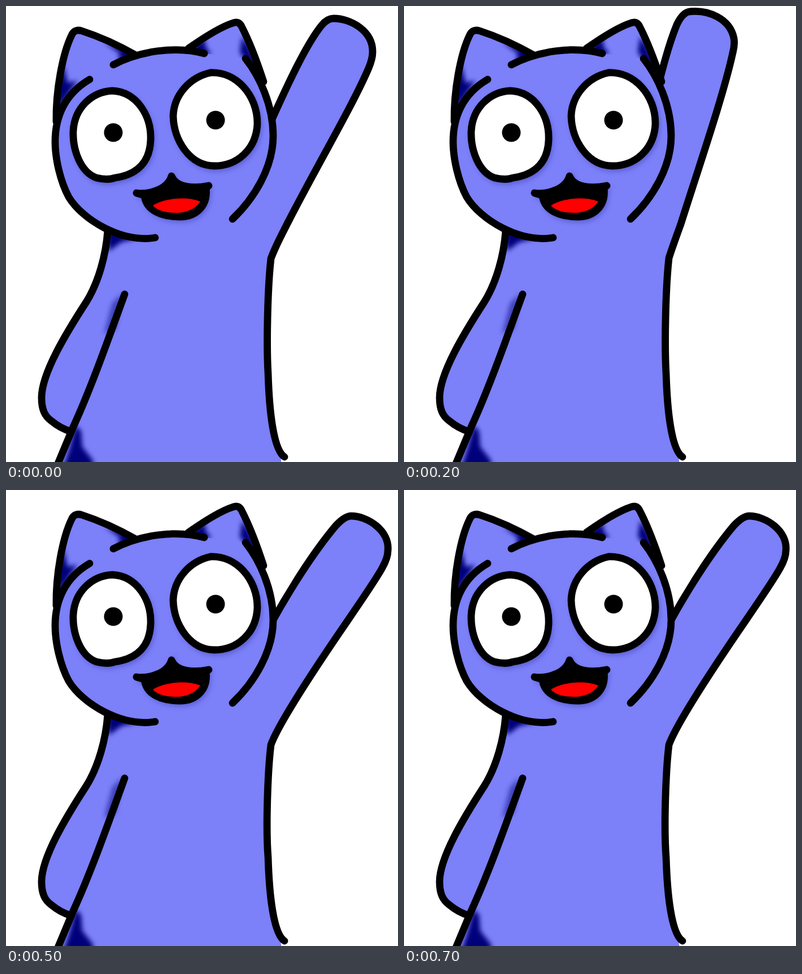
Write an HTML page that moves like this. It is 694x807 px and loops after 800 ms.

```html
<!DOCTYPE html>
<html lang="en">
<head>
<meta charset="utf-8">
<title>Waving cat</title>
<style>
  html, body { margin: 0; width: 100%; height: 100%; overflow: hidden; background: #fff; }
  svg { display: block; width: 694px; height: 807px; }
  .line { fill: none; stroke: #000; stroke-width: 12.8; stroke-linecap: round; stroke-linejoin: round; }
  .skin { fill: #7c80f9; }
  .white { fill: #fff; }
  .ink { fill: #000; }
  .dark { fill: #00007a; filter: url(#soft); }
  .glow { fill: #3c3fae; stroke: #3c3fae; stroke-width: 10; opacity: .5; filter: url(#soft); }

  #arm { animation: wave 800ms step-end infinite; }
  @keyframes wave {
    0%, 50%, 100% { d: path("M300 320L468 207C499 138 532 67 559 34Q569 22 580 22C610 22 650 44 649 82Q649 93 642 110C612 180 545 292 493 395Q476 428 469 447C463 500 461 600 464 650C466 715 473 785 493 798"); }
    12.5%, 37.5% { d: path("M300 320L461 181C480 129 497 75 518 36Q529 15 541 14C575 12 612 32 616 68Q617 79 612 94C590 165 540 278 495 388Q475 430 469 446C463 500 461 600 464 650C466 715 473 785 493 798"); }
    25% { d: path("M300 320L439 185C453 130 466 74 483 33Q493 12 505 10C538 6 577 22 584 57Q586 68 582 83C566 156 526 273 490 386Q474 430 469 446C463 500 461 600 464 650C466 715 473 785 493 798"); }
    62.5%, 87.5% { d: path("M300 320L468 239C497 186 541 114 584 63Q600 46 611 46C640 46 680 72 676 108Q676 120 666 138C640 185 560 290 498 395Q476 432 469 451C463 500 460 600 464 650C466 715 473 785 493 798"); }
    75% { d: path("M300 320L466 264C497 210 550 138 597 91Q614 77 624 78C650 82 690 106 687 138Q687 154 676 170C645 215 560 308 500 404Q474 440 467 459C461 500 459 620 465 685C470 750 478 787 493 798"); }
  }
</style>
</head>
<body>
<svg viewBox="0 0 694 807">
  <defs>
    <filter id="soft" x="-50%" y="-50%" width="200%" height="200%">
      <feGaussianBlur stdDeviation="4"/>
    </filter>
    <path id="body" d="M180 395C177 440 164 489 142 524C107 578 63 650 63 693C63 715 69 726 80 734Q97 748 115 753L90 812H488L486 796C466 760 462 650 463 590L464 460L400 330Z"/>
    <path id="earL" d="M89 205C88 150 100 85 116 52Q121 40 134 44C165 54 200 70 230 87"/>
    <path id="earR" d="M323 75C350 56 380 37 402 30Q412 26 417 36C432 65 445 100 456 134"/>
    <path id="eyeL" d="M188 150C232 152 258 195 256 238C254 285 222 300 193 304Q180 309 160 304C132 294 118 255 119 222C121 180 152 152 188 150Z"/>
    <path id="eyeR" d="M362 118C408 116 445 158 445 208C443 255 408 283 369 283C325 283 297 237 296 195C297 158 325 126 362 118Z"/>
    <path id="mouth" d="M231 331C255 334 286 324 293 301C302 323 335 323 359 318L354 322C358 355 335 373 308 373C275 373 248 362 245 335Z"/>
    <clipPath id="inBody"><use href="#body"/></clipPath>
    <clipPath id="inEars"><use href="#earL"/><use href="#earR"/></clipPath>
  </defs>

  <use href="#body" class="skin"/>
  <path id="arm" class="line" style="fill:#7c80f9" d="M300 320L468 207C499 138 532 67 559 34Q569 22 580 22C610 22 650 44 649 82Q649 93 642 110C612 180 545 292 493 395Q476 428 469 447C463 500 461 600 464 650C466 715 473 785 493 798"/>

  <g clip-path="url(#inBody)">
    <path class="dark" d="M178 395L234 411L204 418L182 434Z"/>
    <path class="dark" opacity=".5" d="M206 508L188 526L174 580L194 572Z"/>
    <path class="dark" d="M123 742L133 752L135 780L154 804V815H102L112 785Z"/>
  </g>

  <!-- ears and head -->
  <use href="#earL" class="skin"/>
  <use href="#earR" class="skin"/>
  <g clip-path="url(#inEars)">
    <path class="dark" d="M102 104L109 136L126 132L112 154L90 188L91 140Z"/>
    <path class="dark" d="M174 64L232 82L220 98L198 94L202 84Z"/>
    <path class="dark" d="M326 74L352 58L354 74L364 84L340 88Z"/>
    <path class="dark" d="M418 54L430 72L456 128L424 96L414 82Z"/>
  </g>
  <path class="skin" d="M148 130C105 155 87 195 87 240C87 270 96 310 111 338C135 378 205 420 264 410L401 377C440 340 473 285 473 230C473 175 448 123 424 93L351 84C300 70 235 80 190 104Z"/>

  <g class="line">
    <use href="#earL"/>
    <use href="#earR"/>
    <path d="M190 104C235 80 300 70 351 84"/>
    <path d="M148 130C105 155 87 195 87 240C87 270 96 310 111 338C135 378 205 420 264 410"/>
    <path d="M424 93C448 123 473 175 473 230C473 285 440 340 401 377"/>
    <path d="M180 398C177 440 164 489 142 524C107 578 63 650 63 693C63 715 69 726 80 734Q97 748 115 753"/>
    <path d="M210 510C181 590 151 675 119 745L91 812"/>
  </g>

  <!-- face -->
  <g class="glow" transform="translate(3 5)">
    <use href="#eyeL"/>
    <use href="#eyeR"/>
    <use href="#mouth"/>
  </g>
  <g class="line">
    <use href="#eyeL" class="white"/>
    <use href="#eyeR" class="white"/>
    <use href="#mouth" class="ink"/>
  </g>
  <circle cx="190" cy="224" r="16.5"/>
  <circle cx="371" cy="202" r="16.5"/>
  <path fill="#f00" d="M260 353C280 340 320 336 344 346C335 360 318 366 302 366C282 366 268 362 260 353Z"/>
</svg>
</body>
</html>
```
